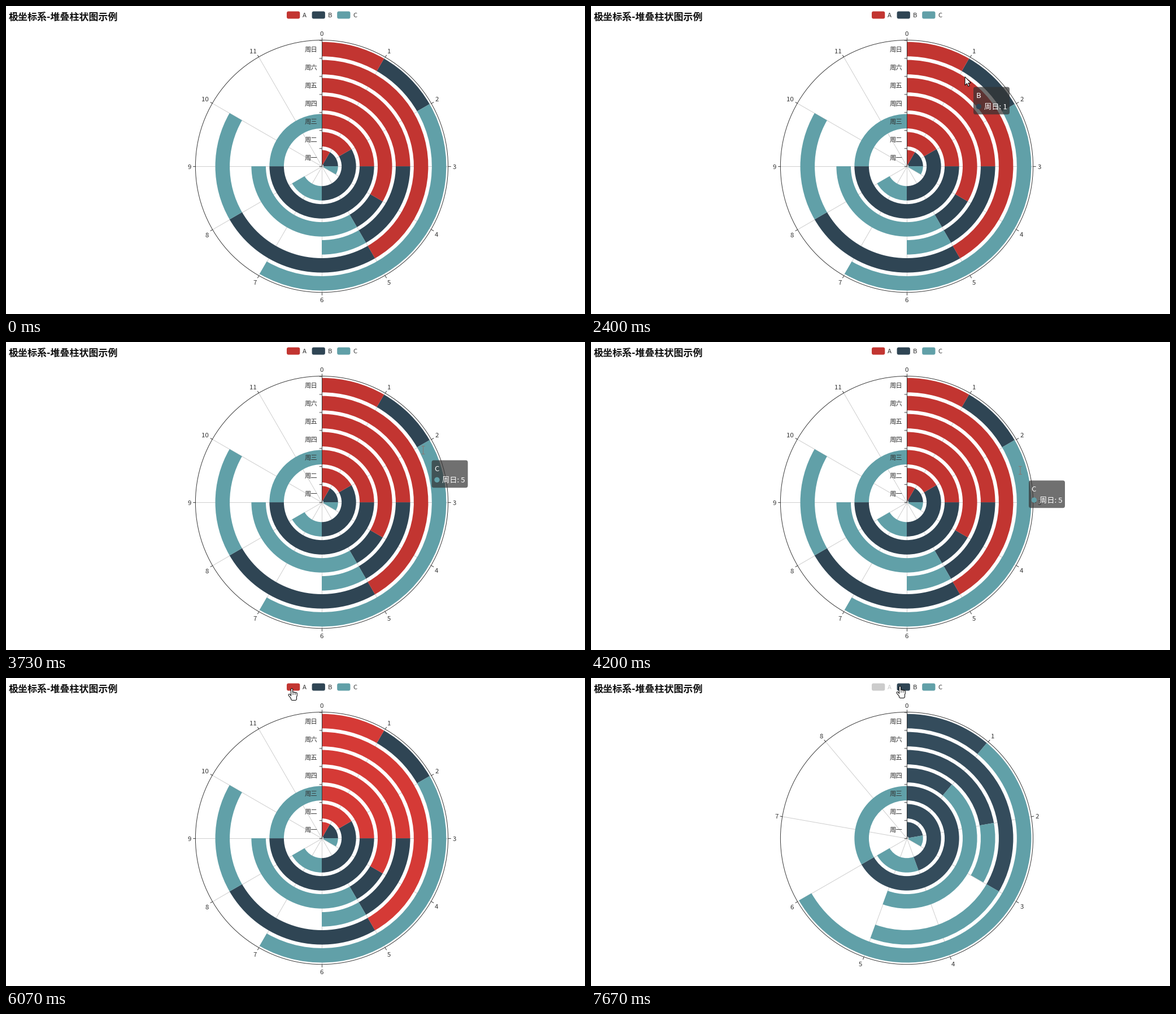
A matplotlib script for the animation above (8 s loop, 1025x546 px).

```python
import numpy as np
import matplotlib.pyplot as plt
from matplotlib.animation import FuncAnimation
from matplotlib.patches import Circle, FancyBboxPatch, Polygon, Wedge
from matplotlib.transforms import Affine2D

W, H, DPI = 1025, 546, 100
FRAMES, INTERVAL = 200, 40
PX = 72 / DPI                      # points per pixel
FONT = "Noto Sans CJK JP"
CX, CY, R = 559.0, 284.1, 223.6
BAND = R / 7
BAR = BAND * 0.8
INK, MUTED = "#333333", "#cccccc"
COLORS = np.array([(194, 53, 49), (47, 69, 84), (97, 160, 168)]) / 255
NAMES = "ABC"
DAYS = ["周" + c for c in "一二三四五六日"]
VALUES = np.array([[1, 2, 3, 4, 3, 5, 1],
                   [2, 4, 6, 1, 2, 3, 1],
                   [1, 2, 3, 4, 1, 2, 5]])
LEGEND_X, LEGEND_STEP, LEGEND_Y = 497, 44.6, 9.5
ICON_W, ICON_H = 23.3, 13

# Timing is in steps of 1/15 s; a move is (start, end, x, y).
CLICK = 95
ENTRY = (1040, 150)
MOVES = [(12, 21, 700, -20), (21, 23, 760, -25), (23, 26, 617, 70.5),
         (26, 32, 655, 110), (33, 39, 668, 140), (39, 46, 705.5, 135),
         (46, 52, 735, 186), (55, 63, 759.5, 227), (76, 79, 640, 50),
         (79, 82, 443, 54), (82, 91, 505.5, 18), (111, 112, 479, 24),
         (112, 115, 546.5, 14)]

fig = plt.figure(figsize=(W / DPI, H / DPI), dpi=DPI, facecolor="white")
ax = fig.add_axes([0, 0, 1, 1])
ax.set(xlim=(0, W), ylim=(H, 0))
ax.axis("off")


def label(x, y, text, size=11.4, color=INK, z=5, **kw):
    return ax.text(x, y, text, fontsize=size * PX, color=color, zorder=z,
                   family=FONT, va="baseline", **kw)


def line(x, y, color=INK, width=0.95, z=4, cap="butt", **kw):
    """A line through pixel centres."""
    return ax.plot(np.add(x, 0.5), np.add(y, 0.5), color=color, lw=width * PX,
                   zorder=z, solid_capstyle=cap, snap=False, **kw)[0]


def rounded(x, y, w, h, radius, color, z=4, **kw):
    style = f"round,pad=0,rounding_size={radius}"
    return ax.add_patch(FancyBboxPatch((x, y), w, h, boxstyle=style, lw=0,
                                       facecolor=color, zorder=z, **kw))


def angle_scale(count):
    """Spokes, ticks and numbers of the angle axis."""
    parts = []
    for i in range(count):
        a = 2 * np.pi * i / count
        dx, dy = np.sin(a), -np.cos(a)
        spoke, tick = np.array([0, R]), np.array([R, R + 4.7])
        parts.append(line(CX + dx * spoke, CY + dy * spoke, MUTED, z=1))
        parts.append(line(CX + dx * tick, CY + dy * tick))
        ha = "center" if abs(dx) < 0.3 else "left" if dx > 0 else "right"
        drop = 4.8 if abs(dy) < 0.3 else 9.8 if dy > 0 else 0.2
        parts.append(label(CX + dx * (R + 7.6), CY + dy * (R + 7.6) + drop,
                           str(i), ha=ha))
    return parts


def show(parts, on):
    for part in parts:
        part.set_visible(on)


# Chart
label(4.7, 24.8, "极坐标系-堆叠柱状图示例", 17, "#111111", weight="bold")
ax.add_patch(Circle((CX, CY), R, fill=False, ec=INK, lw=0.95 * PX, zorder=4))
line([CX, CX], [CY - R, CY])
for i in range(8):
    line([CX - 4.7, CX], [CY - i * BAND] * 2)
for i, day in enumerate(DAYS):
    label(CX - 7.4, CY - (i + 0.5) * BAND + 4.5, day, ha="right")
scale_full, scale_less = angle_scale(12), angle_scale(9)

legend = []
for i, name in enumerate(NAMES):
    x = LEGEND_X + i * LEGEND_STEP
    legend.append((rounded(x, LEGEND_Y, ICON_W, ICON_H, 3.2, COLORS[i]),
                   label(x + 28, 20.3, name)))

bars = [[ax.add_patch(Wedge((CX, CY), (d + 0.9) * BAND, 0, 90, width=BAR,
                            lw=0, zorder=3 if s == 0 else 2))
         for d in range(7)] for s in range(3)]

# Tooltip
tip_shift = Affine2D()
tip_kw = dict(transform=tip_shift + ax.transData)
tip_name = label(4.7, 19.3, "", 13.2, "white", 7, **tip_kw)
tip_value = label(18.7, 39.3, "", 13.2, "white", 7, **tip_kw)
tip_dot = ax.add_patch(Circle((9.4, 34.7), 4.7, lw=0, zorder=7, **tip_kw))
tip = [rounded(0, 0, 64, 48.7, 3.8, (0.2, 0.2, 0.2, 0.7), 6, **tip_kw),
       tip_name, tip_value, tip_dot]

# Pointers, each drawn around its hot spot
pointer_shift = Affine2D()
pointer_kw = dict(transform=pointer_shift + ax.transData)


def arrow():
    points = [(0.5, 0.5), (0.5, 15.5), (4, 12.3), (6.4, 17.6), (8.7, 16.6),
              (6.3, 11.4), (11, 11.4)]
    return [ax.add_patch(Polygon(points, fc="white", ec="black", lw=PX,
                                 zorder=9, **pointer_kw))]


def hand():
    parts = []
    for color, edge, z in (("black", 1, 9), ("white", 0, 10)):
        stroke = dict(color=color, width=2 + 2 * edge, z=z, cap="round",
                      **pointer_kw)
        for i in range(4):
            top = 7 + 0.6 * i if i else 1.5
            parts.append(line([2.6 * i] * 2, [top, 13], **stroke))
        parts.append(line([-4.5, -0.5], [11.5, 16.5], **stroke))
        parts.append(rounded(-0.5 - edge, 12 - edge, 9 + 2 * edge,
                             9 + 2 * edge, 2 + edge, color, z, **pointer_kw))
    return parts


def beam():
    strokes = [([0, 0], [-7, 7])] + [([-3, 3], [y, y]) for y in (-7, 7)]
    return [line(x, y, "#8c7670", 1, 9, **pointer_kw) for x, y in strokes]


pointers = {"arrow": arrow(), "hand": hand(), "beam": beam()}


def pointer_at(step):
    pos = np.array(ENTRY, float)
    for start, end, x, y in MOVES:
        pos += (np.array([x, y]) - pos) * np.clip((step - start) / (end - start), 0, 1)
    return pos


def item_at(step):
    """(series, day) under the pointer; day is None on the legend."""
    x, y = pointer_at(step)
    series, offset = divmod(x - LEGEND_X, LEGEND_STEP)
    if LEGEND_Y < y < LEGEND_Y + ICON_H and 0 <= series < 3 and offset < 37:
        return int(series), None
    ring = np.hypot(x - CX, y - CY) / BAND
    day = int(ring)
    if day > 6 or abs(ring - day - 0.5) > 0.4:
        return None
    value = np.degrees(np.arctan2(x - CX, CY - y)) % 360 / 30
    series = int(np.searchsorted(VALUES[:, day].cumsum(), value))
    return (series, day) if series < 3 else None


def pointer_kind(item):
    if item is None:
        return "arrow"
    return "beam" if item[0] == 2 else "hand"


def draw_bars(step, item):
    # The stack closes up over 300 ms with a cubic ease-out.
    s = np.clip(0.14 + (step - CLICK) / 4.5, 0, 1) if step >= CLICK else 0
    p = 1 - (1 - s) ** 3
    full = np.vstack([np.zeros(7), VALUES.cumsum(axis=0)]) * 30
    less = (np.vstack([VALUES[0], VALUES.cumsum(axis=0)]) - VALUES[0]) * 40
    edges = full + (less - full) * p
    starts = [full[0], edges[1], edges[2]]
    ends = [full[1], edges[2], edges[3]]
    lit = item if pointer_kind(item) == "hand" else (None, None)
    for i, row in enumerate(bars):
        for d, bar in enumerate(row):
            bar.set_theta1(starts[i][d] - 90)
            bar.set_theta2(ends[i][d] - 90)
            glow = lit[0] == i and lit[1] in (d, None)
            bar.set_facecolor(COLORS[i] * (1.1 if glow else 1))
    for d, bar in enumerate(bars[0]):
        thick = BAR * (1 - p)
        bar.set_visible(p < 1)
        bar.set_radius((d + 0.1) * BAND + thick)
        bar.set_width(thick)


def draw_tip(step):
    # The tooltip lingers for a moment after its bar is left.
    recent = [item_at(step - back) for back in range(3)]
    item = next((r for r in recent if r and r[1] is not None), None)
    show(tip, item is not None)
    if item:
        series, day = item
        tip_name.set_text(NAMES[series])
        tip_value.set_text(f"{DAYS[day]}: {VALUES[series, day]}")
        tip_dot.set_facecolor(COLORS[series])
        tip_shift.clear().translate(*pointer_at(step) + (15.5, 18.5))


def update(frame):
    step = int((frame * INTERVAL + 30) * 0.015)
    item = item_at(step)
    clicked = step >= CLICK
    show(scale_full, not clicked)
    show(scale_less, clicked)
    icon, text = legend[0]
    icon.set_facecolor(MUTED if clicked else COLORS[0])
    text.set_color(MUTED if clicked else INK)
    draw_bars(step, item)
    draw_tip(step)
    for kind, parts in pointers.items():
        show(parts, kind == pointer_kind(item))
    pointer_shift.clear().translate(*pointer_at(step))
    return []


anim = FuncAnimation(fig, update, frames=FRAMES, interval=INTERVAL,
                     repeat=True, repeat_delay=0, blit=False)
plt.show()
```
